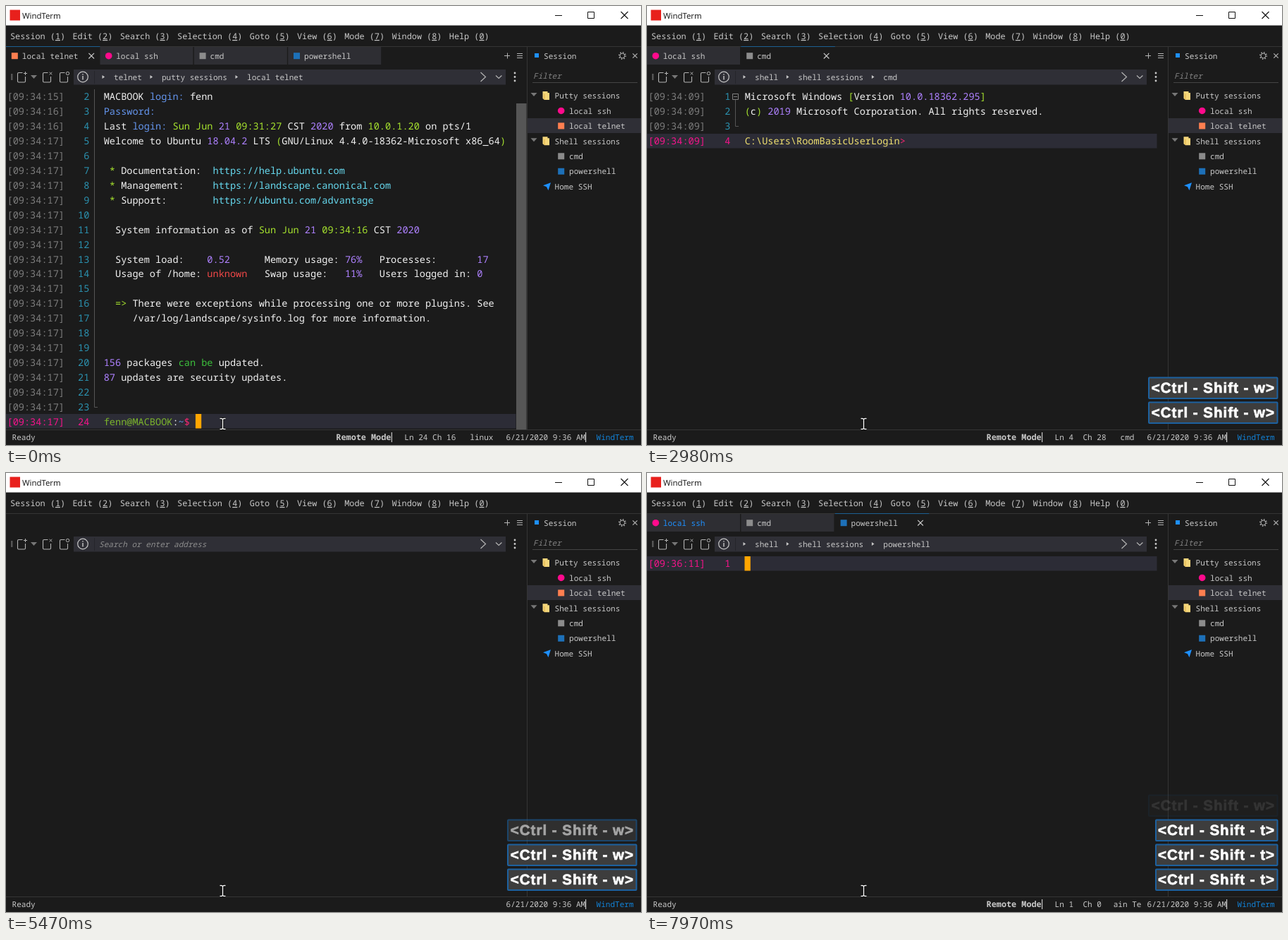
Recreate the animation shown at these times as an HTML page. Size 901 by 622 pixels, loop 8 s.

```html
<!DOCTYPE html>
<html lang="en">
<head>
<meta charset="utf-8">
<title>Terminal sessions</title>
<style>
html, body { margin: 0; width: 100%; height: 100%; overflow: hidden; background: #1b1b1b; }
svg { display: block; }
text { font-family: "Noto Sans Mono", monospace; white-space: pre; text-rendering: geometricPrecision; }
.key { font: bold 20.5px "Liberation Sans", Arial, sans-serif; letter-spacing: 1px; stroke: #fff; stroke-width: .7; }
.title { font-family: "Open Sans", sans-serif; }
.it { font-style: italic; }
.b { font-weight: bold; }
</style>
</head>
<body>
<svg id="stage" width="901" height="622" viewBox="0 0 901 622">
  <g id="frame"></g>
  <g id="view"></g>
  <path id="mouse" fill="none" d="M303.5 584.5h2.5l1.5 1 1.5-1h2.5M307.5 585.5v13M303.5 599.5h2.5l1.5-1 1.5 1h2.5"/>
</svg>
<script>
const BG = '#1b1b1b', PANEL = '#2f2f36', GREY = '#b4b4b4', LIGHT = '#c8c8c8', BLUE = '#1e90ff', PINK = '#f5148a';
const CELL = 8.15, ROW = 20.93, UI = 6.63;
const INK = { p: '#ae81ff', g: '#a6e22e', b: '#6495ed', c: '#66d9ef', r: '#f04848', y: '#f0e070',
              k: '#f92672', u: '#7cb52c', o: '#3cc03c', d: '#2b5e2b' };
const $ = id => document.getElementById(id);

const rect = (x, y, w, h, fill, more = '') => `<rect x="${x}" y="${y}" width="${w}" height="${h}" fill="${fill}" ${more}/>`;
const disc = (x, y, r, fill, more = '') => `<circle cx="${x}" cy="${y}" r="${r}" fill="${fill}" ${more}/>`;
const line = (d, color, width = 1) => `<path d="${d}" fill="none" stroke="${color}" stroke-width="${width}"/>`;
const shape = (d, fill) => `<path d="${d}" fill="${fill}"/>`;
const text = (x, y, s, fill = LIGHT, size = UI / .6, more = '') =>
  `<text x="${x}" y="${y}" fill="${fill}" font-size="${size}" ${more}>${s}</text>`;
const cross = (x, y, r, color, w = 1.2) => line(`M${x - r} ${y - r}l${2 * r} ${2 * r}m0 ${-2 * r}l${-2 * r} ${2 * r}`, color, w);
const paint = s => s.replace(/{(\w)(.*?)}/g, (_, k, t) => `<tspan fill="${INK[k]}">${t}</tspan>`);

function icon(name, x, y) {
  if (name == 'local ssh') return disc(x, y, 4.8, '#ff0a8c');
  const fill = { 'local telnet': '#ff7f50', cmd: '#8c8c8c', powershell: '#1d70b8' }[name];
  return rect(x - 4.5, y - 4.5, 9, 9, fill);
}

function drawFrame() {
  let s = rect(0, 0, 901, 622, BG) + rect(0, 0, 901, 27.5, '#fff')
    + rect(5.5, 5.5, 14.5, 15, '#e8201c') + text(23, 18, 'WindTerm', '#111', 11.4, 'class="title"')
    + line('M779 13.5h10M825.5 8.5h9v9h-9z', '#111') + cross(877.5, 13, 5, '#111', 1.1);
  let x = 6;
  'Session Edit Search Selection Goto View Mode Window Help'.split(' ').forEach((name, i) => {
    s += text(x, 47, `${name} (<tspan text-decoration="underline">${(i + 1) % 10 + (i > 4 && i < 7 ? 0 : 0)}</tspan>)`
      .replace(/>\d</, `>${[1, 2, 3, 4, 5, 6, 7, 8, 0][i]}<`), LIGHT, 11.83);
    x += (name.length + 4) * 7.1 + 10.4;
  });
  s += line('M0 57.5h901M739.5 57v543M0 600.5h901', '#353535');
  // tab bar buttons and toolbar
  s += line('M707 70.5h8M711.5 66.5v8M725 67.5h8M725 70.5h8M725 73.5h8', GREY)
    + rect(7, 96, 2.5, 9, '#555') + shape('M35 98h9l-4.5 5z', '#777');
  for (const at of [16.5, 52.5, 76.5])
    s += line(`M${at + 7} 94.5h-5.5q-1.5 0-1.5 1.5v10.5q0 1.5 1.5 1.5h8q1.5 0 1.5-1.5v-6.5`, GREY, 1.1);
  s += line('M25 95.5h5M27.5 93v5', GREY) + cross(63.5, 95.5, 1.8, GREY, 1) + disc(87.5, 95.5, 2.2, 'none', `stroke="${GREY}"`);
  s += rect(96, 90, 613, 21.5, PANEL) + disc(109, 100.5, 7.3, 'none', `stroke="${LIGHT}" stroke-width="1.2"`)
    + line('M109 99v5.5M109 96v1.6', LIGHT, 1.4) + line('M125.5 92v18', '#25252b')
    + line('M673.5 94l7 6.5-7 6.5M695 98.5l4.2 4 4.2-4', GREY, 1.2);
  for (const y of [95, 100.5, 106]) s += disc(722, y, 1.4, LIGHT);
  // side panel
  s += rect(750, 67, 6, 6, BLUE) + text(763, 75, 'Session')
    + disc(874.5, 70.5, 3.4, 'none', `stroke="${GREY}"`)
    + disc(874.5, 70.5, 4.7, 'none', `stroke="${GREY}" stroke-width="1.6" stroke-dasharray="1.4 2.29"`)
    + cross(892.5, 70.5, 3.2, GREY) + text(748, 103, 'Filter', '#808080', UI / .6, 'class="it"')
    + line('M747 108.5h149', '#444') + rect(740, 159, 161, 21, PANEL);
  ['Putty sessions', 'local ssh', 'local telnet', 'Shell sessions', 'cmd', 'powershell', 'Home SSH'].forEach((name, i) => {
    const y = 127 + i * 21.45, top = i % 3 == 0;
    s += text(top ? 778.5 : 799, y + 4.2, name);
    if (!top) s += icon(name, 787.7, y);
    else if (i < 6) s += shape(`M744.5 ${y - 4}h9l-4.5 5z`, '#777')
      + shape(`M761.5 ${y - 6}h7v2h2.5v10h-7l-2.5-2z`, '#f5d67b') + line(`M764 ${y + 5.5}v-8`, '#dcae42');
    else s += shape(`M773 ${y - 5.5}l-3.5 11-2.5-5-5-2z`, BLUE);
  });
  // status bar
  return s + text(8.5, 615, 'Ready') + text(709.5, 615, '6/21/2020 9:36 AM') + rect(822, 604, 1.2, 14, LIGHT)
    + text(837.5, 615, 'WindTerm', '#1283d8');
}

const banner = (time, mem, procs, can) => [
  'Welcome to Ubuntu {p18.04.2} LTS {g(}GNU/Linux 4.4.0-18362-Microsoft x86_64{g)}', '',
  ' {g*} Documentation:  {chttps://help.ubuntu.com}',
  ' {g*} Management:     {chttps://landscape.canonical.com}',
  ' {g*} Support:        {chttps://ubuntu.com/advantage}', '',
  `  System information as of {gSun Jun} {p21} {g${time}} CST {p2020}`, '',
  `  System load:    {p0.52}      Memory usage: {p${mem}%}   Processes:       {p${procs}}`,
  '  Usage of /home: {runknown}   Swap usage:   {p11%}   Users logged in: {p0}', '',
  '  {g=>} There were exceptions while processing one or more plugins. See',
  '     /var/log/landscape/sysinfo.log for more information.', '', '',
  `{p156} packages {${can}can be} updated.`,
  '{p87} updates are security updates.', '', ''];
const prompt = '{ufenn@MACBOOK}:{b~}{k$}';
const home = 'C:\\Users\\RoomBasicUserLogin';

const telnet = {
  tabs: ['local telnet', 'local ssh', 'cmd', 'powershell'], on: 0, path: ['telnet', 'putty sessions', 'local telnet'],
  first: 2, stamp: i => '09:34:' + (15 + Math.min(2, Math.ceil(i / 2))), scroll: true,
  lines: ['MACBOOK {blogin:} fenn', '{bPassword:}',
    'Last {blogin:} {gSun Jun} {p21} {g09:31:27} CST {p2020} from {g10.0.1.20} on pts/1',
    ...banner('09:34:16', 76, 17, 'o'), prompt],
  col: 16, block: true, label: 'linux', keys: ''
};
const shell = {
  tabs: ['local ssh', 'cmd', 'powershell'], on: 2, path: ['shell', 'shell sessions', 'powershell'],
  first: 1, stamp: () => '09:34:12', col: 32, label: 'powershell', keys: 'w',
  lines: ['Windows PowerShell', 'Copyright {g(}C{g)} Microsoft Corporation. All rights reserved.', '',
    'Try the new cross-platform PowerShell {chttps://aka.ms/pscore6}', '', `PS {y${home}}{k>}`]
};
const cmd = {
  tabs: ['local ssh', 'cmd'], on: 1, path: ['shell', 'shell sessions', 'cmd'],
  first: 1, stamp: () => '09:34:09', col: 28, label: 'cmd', keys: 'w w',
  lines: ['Microsoft Windows {g[}Version {p10.0.18362.295}{g]}',
    '{g(}c{g)} {p2019} Microsoft Corporation. All rights reserved.', '', `{y${home}}{k>}`]
};
const ssh = {
  tabs: ['local ssh'], on: 0, path: ['ssh', 'putty sessions', 'local ssh'],
  first: 1, stamp: i => '09:35:3' + (i < 20 ? 1 : 2), col: 16, block: true, label: 'linux', keys: 'w w w',
  lines: [...banner('09:35:31', 75, 15, 'd'),
    'Last {blogin:} {gSun Jun} {p21} {g09:34:16} {p2020} from {g10.0.1.20}', prompt]
};
const none = { tabs: [], lines: [], keys: 'w w w' };
const blank = (base, time, keys, more) => ({ ...base, lines: [''], col: 0, block: true, stamp: () => time, keys, ...more });
const hidden = { col: -1 };

// a key is its letter, then its opacity when fading; oldest first
const states = [
  [0, telnet], [1000, shell], [1490, { ...shell, ...hidden }], [1980, shell],
  [2490, cmd], [2980, { ...cmd, ...hidden }],
  [3500, ssh], [3990, { ...ssh, keys: 'w.6 w w' }],
  [4480, none], [5470, { ...none, keys: 'w.6 w w' }], [5990, { ...none, keys: 'w w' }],
  [6480, blank(ssh, '09:36:09', 'w.6 w t')],
  [6950, blank(cmd, '09:36:10', 'w t t', { label: 'linux', plain: true })],
  [7550, { ...cmd, stamp: () => '09:36:10', keys: 'w.5 t t', fresh: true }],
  [7970, blank(shell, '09:36:11', 'w.1 t t t', { label: 'cmd', plain: true, fresh: true })]
];

function drawTabs(v) {
  return v.tabs.map((name, i) => {
    const x = i * 133.4, on = i == v.on;
    return (on ? '' : rect(x, 58, 132, 25, '#2e2e33'))
      + (on && v.tabs.length > 1 ? rect(x, 57, 133.4, 1, '#1d5f92') : '')
      + icon(name, x + 12.3, 70.7) + text(x + 22.8, 75, name, i == 0 && v.fresh ? BLUE : LIGHT)
      + (on ? cross(x + 121.2, 70.7, 3.8, LIGHT) : '');
  }).join('');
}

function drawPath(path) {
  if (!path) return text(132, 104.7, 'Search or enter address', '#8c8c8c', UI / .6, 'class="it"');
  let x = 153;
  return path.map(name => {
    const s = shape(`M${x - 16.5} 98l3.6 2.5-3.6 2.5z`, LIGHT) + text(x, 104.7, name);
    x += name.length * UI + 28.2;
    return s;
  }).join('');
}

function drawLines(v) {
  const size = CELL / .6, last = v.lines.length - 1;
  if (last < 0) return '';
  const top = Math.round(118 + last * ROW), fold = Math.round(128 + (last - 1) * ROW) + .5;
  let s = rect(0, top, 723.5, 20.5, '#2c2c36');
  if (last) {
    s += line(`M125.5 ${v.first > 1 ? 118 : 133}V${fold}H130`, '#555');
    if (v.first == 1) s += line('M121.5 124.5h8v8h-8zM123 128.5h5', '#808080');
  }
  v.lines.forEach((t, i) => {
    const y = Math.round(133.3 + i * ROW), on = i == last;
    s += text(1.5, y, `[${v.stamp(i)}]`, on ? PINK : '#7c7c7c', size)
      + text(118.3, y, v.first + i, on ? PINK : '#2b91af', size, 'text-anchor="end"')
      + text(138.7, y, paint(t), '#f2f2f2', size);
  });
  if (v.col >= 0) s += v.block ? rect(138.5 + v.col * CELL, top, 8.3, 20.5, '#ffa500')
    : rect(138.1 + v.col * CELL, top, 2.3, 20.5, '#ffa500');
  if (v.scroll) s += rect(724, 138, 14.5, 462, '#565656');
  return s;
}

function drawStatus(v) {
  if (!v.label) return '';
  const width = v.label.length * UI, x = 501.5 - width, box = width + 19;
  const row = String(v.first + v.lines.length - 1), col = v.col < 0 ? 28 + 4 * (v.label == 'powershell') : v.col;
  return text(x, 615, 'Remote Mode', LIGHT, 11.83, 'class="b"') + rect(x + 78.4, 604, 1.2, 14, LIGHT)
    + text(x + 97, 615, `Ln ${row.padEnd(2)} Ch ${col}`)
    + (v.plain
      ? `<svg x="${701 - box}" y="601" width="${box}" height="20">${text(box / 2, 14, 'Plain Text', LIGHT, UI / .6, 'text-anchor="middle"')}</svg>`
      : text(691.5 - width, 615, v.label));
}

function drawKeys(keys) {
  return keys.split(' ').filter(Boolean).reverse().map((k, i) => {
    const x = k[0] == 'w' ? 712 : 722, y = 561.5 - i * 35;
    return `<g opacity="${k.slice(1) || 1}">`
      + rect(x, y, 894.5 - x, 29.5, '#3d3d3d', 'stroke="#1d619f" stroke-width="2" rx="1"')
      + `<text class="key" x="891" y="${y + 21}" fill="#fff" text-anchor="end">&lt;Ctrl - Shift - ${k[0]}&gt;</text></g>`;
  }).join('');
}

const mouse = $('mouse'), halo = mouse.cloneNode();
mouse.setAttribute('stroke', '#fff');
mouse.setAttribute('stroke-width', 1.4);
halo.removeAttribute('id');
halo.setAttribute('stroke', '#000');
halo.setAttribute('stroke-width', 3.4);
mouse.before(halo);
$('frame').innerHTML = drawFrame();

let shown;
function tick() {
  const t = performance.now() % 8000;
  const v = states.filter(s => s[0] <= t).pop()[1];
  if (v != shown) {
    $('view').innerHTML = drawTabs(v) + drawPath(v.path) + drawLines(v) + drawStatus(v) + drawKeys(v.keys);
    shown = v;
  }
  requestAnimationFrame(tick);
}
tick();
</script>
</body>
</html>
```
